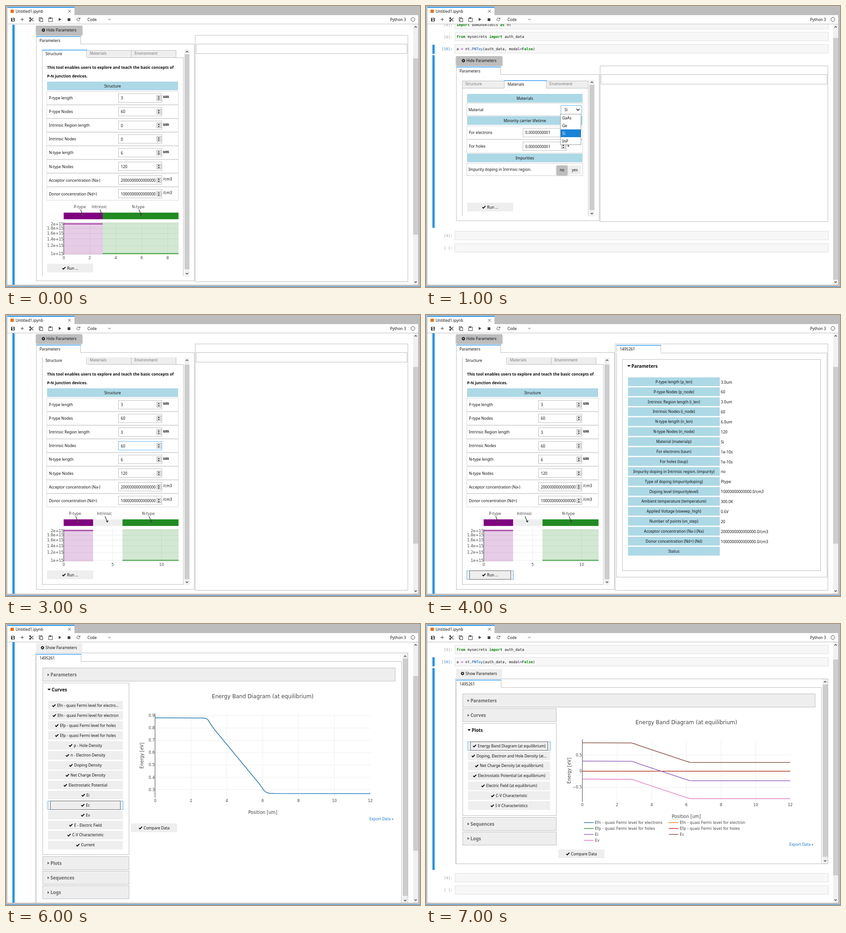
These frames come from a looping animation (907x617 px, 8 s). An HTML page with a canvas:

```html
<!DOCTYPE html>
<html lang="en">
<head>
<meta charset="utf-8">
<title>P-N junction notebook</title>
<style>
  html, body { margin: 0; width: 100%; height: 100%; overflow: hidden; background: #fff; }
  canvas { display: block; width: 907px; height: 617px; }
</style>
</head>
<body>
<canvas id="stage" width="907" height="617"></canvas>
<script>
const ctx = document.getElementById('stage').getContext('2d');
const UI = '8.4px "Noto Sans", sans-serif';
const UI_BOLD = 'bold 8.5px "Noto Sans", sans-serif';
const HEADING = 'bold 9.9px "Noto Sans", sans-serif';
const SERIF = 'bold 9.4px "Liberation Serif", serif';
const MONO = '7.94px "DejaVu Sans Mono", monospace';
const MONO_BOLD = 'bold ' + MONO;
const plotFont = size => size + 'px "DejaVu Sans", sans-serif';
const BLUE = '#2196f3', LINE = '#bdbdbd', PALE = '#eee', SKY = '#add8e6';

// ---- basic shapes ----
const snap = v => Math.floor(v) + 0.5;
function fill(x0, y0, x1, y1, color) {
  ctx.fillStyle = color;
  ctx.fillRect(Math.round(x0), Math.round(y0), Math.round(x1) - Math.round(x0), Math.round(y1) - Math.round(y0));
}
function softFill(x0, y0, x1, y1, color) {
  ctx.fillStyle = color;
  ctx.fillRect(x0, y0, x1 - x0, y1 - y0);
}
function frame(x0, y0, x1, y1, color = LINE, back) {
  if (back) fill(x0, y0, x1, y1, back);
  ctx.strokeStyle = color;
  ctx.lineWidth = 1;
  ctx.strokeRect(snap(x0), snap(y0), snap(x1) - snap(x0), snap(y1) - snap(y0));
}
function path(points, color, width = 1) {
  ctx.beginPath();
  points.forEach(([x, y]) => ctx.lineTo(x, y));
  ctx.strokeStyle = color;
  ctx.lineWidth = width;
  ctx.stroke();
}
function poly(points, color) {
  ctx.beginPath();
  points.forEach(([x, y]) => ctx.lineTo(x, y));
  ctx.fillStyle = color;
  ctx.fill();
}
const rule = (x0, y0, x1, y1, color = LINE) => path([[snap(x0), snap(y0)], [snap(x1), snap(y1)]], color);
// y is the middle of the capitals
function text(s, x, y, { font = UI, color = '#111', align = 'left' } = {}) {
  ctx.font = font;
  ctx.fillStyle = color;
  ctx.textAlign = align;
  ctx.fillText(s, x, y + 0.36 * parseFloat(font.replace('bold ', '')));
}
function clipped(x0, y0, x1, y1, draw) {
  ctx.save();
  ctx.beginPath();
  ctx.rect(x0, Math.round(y0), x1 - x0, Math.round(y1) - Math.round(y0));
  ctx.clip();
  draw();
  ctx.restore();
}
function chevron(x, y, dir, size = 2.5, color = '#444', width = 1.4) {
  path([[x - size, y - dir * size / 2], [x, y + dir * size / 2], [x + size, y - dir * size / 2]], color, width);
}
function check(x, y) {
  path([[x + 0.8, y], [x + 3, y + 2.2], [x + 7.4, y - 2.4]], '#111', 2);
}
function gear(x, y) {
  ctx.beginPath();
  for (let i = 0; i < 32; i++) {
    const r = i % 4 < 2 ? 4 : 3, a = i * Math.PI / 16;
    ctx.lineTo(x + r * Math.cos(a), y + r * Math.sin(a));
  }
  ctx.closePath();
  ctx.moveTo(x + 1.4, y);
  ctx.arc(x, y, 1.4, 0, 7);
  ctx.fillStyle = '#111';
  ctx.fill('evenodd');
}

// ---- widgets ----
function scrollbar(x, y0, y1, t0, t1) {
  fill(x, y0, x + 11, y1, '#f0f0f0');
  fill(x, t0, x + 11, t1, '#cdcdcd');
  chevron(x + 5.5, y0 + 6, -1);
  chevron(x + 5.5, y1 - 6, 1);
}
function button(x0, y0, x1, y1, back = PALE, raised = false) {
  ctx.save();
  if (raised) Object.assign(ctx, { shadowColor: 'rgba(0,0,0,.4)', shadowBlur: 3, shadowOffsetY: 1.5 });
  fill(x0, y0, x1, y1, back);
  ctx.restore();
}
function checkButton(label, x0, y0, x1, { focus = false, raised = false } = {}) {
  button(x0, y0, x1, y0 + 19, PALE, raised);
  if (focus) {
    frame(x0 - 0.5, y0, x1, y0 + 19, '#64b5f6');
    frame(x0 + 5, y0, x1 - 5.5, y0 + 19, '#666');
  }
  ctx.font = UI;
  const left = (x0 + x1 - ctx.measureText(label).width - 11) / 2;
  check(left, y0 + 9.7);
  text(label, left + 11, y0 + 9.7);
}
function tab(label, x0, x1, y, active) {
  if (active) {
    fill(x0, y, x1 + 1, y + 18, '#fff');
    rule(x0, y, x0, y + 17);
    rule(x1, y, x1, y + 17);
    softFill(x0, y, x1 + 1, y + 1.4, BLUE);
    text(label, x0 + 7.5, y + 9.2);
  } else {
    frame(x0, y + 1, x1, y + 17, LINE, PALE);
    text(label, x0 + 7, y + 8.3, { color: '#777' });
  }
}
function header(label, x1, y) {
  fill(90, y, x1, y + 19, SKY);
  text(label, (90 + x1) / 2, y + 9.7, { align: 'center' });
}
function spinner(x, y) {
  frame(x, y - 5.5, x + 9, y + 5, '#aaa', '#eee');
  poly([[x + 2.5, y - 1.2], [x + 7, y - 1.2], [x + 4.75, y - 4]], '#222');
  poly([[x + 2.5, y + 1.2], [x + 7, y + 1.2], [x + 4.75, y + 4]], '#222');
}
function field(label, value, unit, y, { x1, input, focus = false }) {
  frame(89, y - 15, x1, y + 14, '#d8d8d8');
  text(label, 94, y);
  frame(input, y - 10, input + 95, y + 9, focus ? '#64b5f6' : LINE);
  text(value, input + 5.5, y + 0.3);
  spinner(input + 84, y);
  text(unit, input + 98, y - 3, { font: unit[0] === '/' ? UI : SERIF });
}
function triangle(x, y, open, color) {
  poly(open ? [[x, y - 2], [x + 7, y - 2], [x + 3.5, y + 2]] : [[x, y - 3], [x + 4, y], [x, y + 3]], color);
}
function accordion(label, x1, y0, y1) {
  const open = y1 - y0 > 40;
  frame(80, y0, x1, y1, LINE, open ? '#fff' : PALE);
  triangle(91, y0 + 15, open, open ? '#111' : '#666');
  text(label, open ? 100 : 97.5, y0 + 15.2, { font: HEADING, color: open ? '#111' : '#666' });
}

// ---- application window ----
function chrome() {
  fill(0, 0, 907, 617, LINE);
  fill(3, 20, 903, 612, '#fff');
  fill(3, 2, 150, 21, '#fff');
  fill(3, 2, 150, 4, BLUE);
  fill(10, 8, 17, 15, '#ef6c00');
  text('Untitled1.ipynb', 21, 12);
  path([[136, 8.5], [142, 14.5]], '#444');
  path([[142, 8.5], [136, 14.5]], '#444');
  fill(3, 39, 903, 40, LINE);
  fill(0, 616, 907, 617, BLUE);

  const ink = '#444';
  fill(11, 26, 19, 34, ink);
  fill(13, 27, 17, 29, '#fff');
  fill(14, 30, 17, 33, '#fff');
  path([[32, 29.5], [39, 29.5]], ink);
  path([[35.5, 26], [35.5, 33]], ink);
  path([[52, 26], [60, 33.5]], ink, 1.3);
  path([[60, 26], [52, 33.5]], ink, 1.3);
  for (const y of [26.8, 32.5]) {
    ctx.beginPath();
    ctx.arc(53, y, 1.5, 0, 7);
    ctx.stroke();
  }
  frame(72, 25, 78, 32, ink);
  frame(74, 27, 80, 34, ink, '#fff');
  frame(93, 26, 101, 34, ink);
  fill(95, 25, 99, 28, ink);
  poly([[115.5, 26], [115.5, 33], [121, 29.5]], ink);
  fill(135, 27, 141, 33, ink);
  ctx.beginPath();
  ctx.arc(158.5, 29.5, 3.2, 0.3, 5.4);
  ctx.stroke();
  poly([[159, 28.7], [162.5, 28.7], [162.5, 25.3]], ink);
  text('Code', 178.5, 29.7);
  chevron(226.5, 29.5, 1, 2.8, ink, 1);
  text('Python 3', 841.5, 29.7);
  ctx.beginPath();
  ctx.arc(891.5, 29.5, 4.2, 0, 7);
  ctx.lineWidth = 1;
  ctx.stroke();
}

function cell(number, y, right, code = []) {
  const active = number === '10';
  frame(63, y, right, y + 19, '#e0e0e0', '#f7f7f7');
  text(`[${number}]:`, 58, y + 9.8, { font: MONO, color: active ? '#307fc1' : '#999', align: 'right' });
  if (active) fill(14, y, 19, y + 20, BLUE);
  let x = 67;
  for (const [part, color = '#111', font = MONO] of code) {
    text(part, x, y + 9.6, { font, color });
    x += ctx.measureText(part).width;
  }
}
const key = word => [word, '#008000', MONO_BOLD];
const op = sign => [sign, '#aa22ff', MONO_BOLD];

function notebook(top, height, right = 881) {
  const y = top - 46.8;
  cell('8', y - 53.5, right, [key('import'), [' domunoktools '], key('as'), [' nt']]);
  cell('9', y - 26.8, right, [key('from'), [' mysecrets '], key('import'), [' auth_data']]);
  cell('10', y, right, [['a '], op('='), [' nt.'], ['PNToy', '#0055aa'], ['(auth_data, modal'], op('='), key('False'), [')']]);
  fill(14, top - 23.5, 19, top + height + 14, BLUE);
  cell('4', top + height + 21.2, right);
  cell(' ', top + height + 48, right);
}

// ---- parameter forms ----
function paramsPanel(top, height, R, activeTab, scroll, thumb, content, right = 880) {
  const bottom = top + height, side = R - 23.5;
  button(66, top - 21.5, 167, top - 1.5, LINE, true);
  gear(82, top - 11.5);
  text('Hide Parameters', 88.5, top - 11.5);
  frame(66, top + 19, R, bottom - 1.5);
  tab('Parameters', 66, 163, top + 1.8, true);
  frame(R + 2, top, right, bottom);

  clipped(78, top + 29.5, R - 22, bottom - 12, () => {
    ctx.save();
    ctx.translate(0, -scroll);
    frame(79, top + 49, side, bottom - 8.5);
    const w = Math.min(97.7, (side - 79) / 3);
    const names = ['Structure', 'Materials', 'Environment'];
    names.forEach((label, i) => {
      if (i !== activeTab) tab(label, 79 + i * w, 79 + (i + 1) * w, top + 31.5, false);
    });
    tab(names[activeTab], 79 + activeTab * w, 79 + (activeTab + 1) * w, top + 31.5, true);
    content(top);
    ctx.restore();
  });
  scrollbar(Math.round(R - 21.5), top + 30, bottom - 11.5, thumb[0], thumb[1]);
}
function emptyOutput(top, R, right = 878) {
  frame(R + 4, top + 19, right, top + 40);
}

function dopingPlot(y, intrinsic) {
  const step = intrinsic ? 21.43 : 28.45, X = v => 126.6 + v * step;
  const pEnd = X(3), nStart = X(3 + intrinsic), end = 378;
  const font = plotFont(8.35), purple = '#800080', green = '#228b22', ink = '#444';

  softFill(126.4, y + 12.7, pEnd, y + 27.2, purple);
  softFill(pEnd, y + 12.7, nStart, y + 27.2, PALE);
  softFill(nStart, y + 12.7, end, y + 27.2, green);
  [['P-type', 1.5], ['Intrinsic', 3 + intrinsic / 2], ['N-type', 6 + intrinsic]].forEach(([label, v]) => {
    const x = X(v) - 1;
    text(label, x - 6.5, y, { font, color: ink, align: 'center' });
    path([[x - 5, y + 6], [x - 0.5, y + 17]], ink, 1.4);
    poly([[x + 0.5, y + 20], [x - 3.5, y + 16.5], [x + 2.5, y + 15]], ink);
  });

  for (const v of [1, 1.2, 1.4, 1.6, 1.8, 2]) {
    const ty = y + 102.5 - 65 * Math.log2(v);
    rule(126, ty, end, ty, '#eee');
    text(v + 'e+15', 126, ty, { font, color: ink, align: 'right' });
  }
  for (let v = 0; X(v) < end; v += intrinsic ? 5 : 2) {
    rule(X(v), y + 34, X(v), y + 105, '#eee');
    text(v, X(v), y + 112, { font, color: ink, align: 'center' });
  }
  softFill(126.4, y + 34, pEnd, y + 105, 'rgba(128,0,128,.2)');
  softFill(nStart, y + 34, end, y + 105, 'rgba(34,139,34,.2)');
  rule(126, y + 34, 126, y + 105, '#444');
  path([[126, y + 37.5], [pEnd, y + 37.5]], purple, 1.5);
  path([[nStart, y + 102.5], [end, y + 102.5]], green, 1.5);
}

function structureForm(intrinsic, focus) {
  return top => {
    text('This tool enables users to explore and teach the basic concepts of', 90, top + 70.5, { font: UI_BOLD });
    text('P-N junction devices.', 90, top + 89.5, { font: UI_BOLD });
    header('Structure', 377, top + 101.5);
    [
      ['P-type length', '3', 'um'],
      ['P-type Nodes', '60', ''],
      ['Intrinsic Region length', String(intrinsic), 'um'],
      ['Intrinsic Nodes', String(intrinsic * 20), ''],
      ['N-type length', '6', 'um'],
      ['N-type Nodes', '120', ''],
      ['Acceptor concentration (Na-)', '2000000000000000', '/cm3'],
      ['Donor concentration (Nd+)', '1000000000000000', '/cm3'],
    ].forEach(([label, value, unit], i) =>
      field(label, value, unit, top + 137.5 + i * 30.1, { x1: 377, input: 246, focus: focus === 'nodes' && i === 3 }));
    dopingPlot(top + 376.5, intrinsic);
    checkButton('Run ...', 90, top + 501.5, 191, { focus: focus === 'run' });
  };
}

function materialsForm(top) {
  header('Materials', 343, top + 61.5);
  frame(89, top + 82, 343, top + 109, '#d0d0d0');
  text('Material', 93, top + 96);
  header('Minority carrier lifetime', 343, top + 110.5);
  field('For electrons', '0.0000000001', 's', top + 146.5, { x1: 343, input: 212 });
  field('For holes', '0.0000000001', 's', top + 176.7, { x1: 343, input: 212 });
  header('Impurities', 343, top + 192.5);
  frame(89, top + 214, 343, top + 241, '#d0d0d0');
  text('Impurity doping in Intrinsic region.', 93, top + 227.5);
  button(286, top + 218, 310, top + 238, LINE, true);
  text('no', 298, top + 228, { align: 'center' });
  button(312, top + 218, 339, top + 238);
  text('yes', 326, top + 228, { align: 'center' });
  checkButton('Run ...', 90, top + 300.5, 191);

  frame(295, top + 86.5, 340, top + 105.5, '#64b5f6', '#fff');
  text('Si', 303.5, top + 96);
  chevron(333, top + 96, 1, 3.4, '#111', 1.6);
  frame(294, top + 105.5, 339, top + 173, '#999', '#fff');
  fill(295, top + 139, 339, top + 156, '#1883d7');
  ['GaAs', 'Ge', 'Si', 'InP'].forEach((name, i) =>
    text(name, 298.5, top + 114 + i * 17, { color: i === 2 ? '#fff' : '#111' }));
}

function environmentForm(top) {
  header('Environment', 343, top + 61.5);
  [['Ambient temperature', '300', 'K'], ['Applied Voltage', '0.6', 'V'], ['Number of points', '20', '']]
    .forEach(([label, value, unit], i) => field(label, value, unit, top + 97 + i * 30.1, { x1: 343, input: 212 }));
  checkButton('Run ...', 90, top + 181.5, 191);
}

// ---- results ----
function summary(done) {
  frame(417, 83, 878, 575);
  tab('1495261', 417, 514, 65.9, true);
  frame(430, 97, 864, 561);
  triangle(441, 112, true, '#111');
  text('Parameters', 450, 112, { font: HEADING });
  [
    ['P-type length (p_len)', '3.0um'],
    ['P-type Nodes (p_node)', '60'],
    ['Intrinsic Region length (i_len)', '3.0um'],
    ['Intrinsic Nodes (i_node)', '60'],
    ['N-type length (n_len)', '6.0um'],
    ['N-type Nodes (n_node)', '120'],
    ['Material (materialp)', 'Si'],
    ['For electrons (taun)', '1e-10s'],
    ['For holes (taup)', '1e-10s'],
    ['Impurity doping in Intrinsic region. (impurity)', 'no'],
    ['Type of doping (impuritydoping)', 'Ptype'],
    ['Doping level (impuritylevel)', '10000000000000.0/cm3'],
    ['Ambient temperature (temperature)', '300.0K'],
    ['Applied Voltage (vsweep_high)', '0.6V'],
    ['Number of points (vn_step)', '20'],
    ['Acceptor concentration (Na-) (Na)', '2000000000000000.0/cm3'],
    ['Donor concentration (Nd+) (Nd)', '1000000000000000.0/cm3'],
    ['Status', done ? '2019-06-12T12:56:51-0400 domuNOK rappture 20...' : ''],
  ].forEach(([label, value], i) => {
    const y = 147 + i * 21.88;
    softFill(442.6, y - 10, 643.6, y + 9.2, SKY);
    text(label, 543, y - 0.2, { align: 'center' });
    text(value, 646, y + 0.5);
  });
  if (done) checkButton('Load Results', 443, 531, 544, { raised: true });
}

function resultsPanel(top, bottom, thumb) {
  button(66, top - 21.5, 167, top - 1.5);
  gear(80, top - 11.5);
  text('Show Parameters', 86.5, top - 11.5);
  frame(64, top, 880, bottom);
  scrollbar(869, Math.round(top) + 1, Math.min(bottom, 613), thumb[0], thumb[1]);
  clipped(64, top, 868, bottom, () => frame(66, top + 19, 866, bottom + 9));
  tab('1495261', 66, 164, top + 2.3, true);
  accordion('Parameters', 852, top + 33, top + 62);
}

function buttonList(labels, x1, y, focused) {
  labels.forEach((label, i) => checkButton(label, 92, y + i * 21.88, x1, { focus: i === focused }));
}

function axes({ title, x0, step, y0, y1, titleY, ticks, Y, labelY, unitX }) {
  const ink = '#444', font = plotFont(8.35), center = x0 + 6 * step;
  text(title, center, titleY, { font: plotFont(11.7), color: ink, align: 'center' });
  for (const v of ticks) {
    rule(x0, Y(v), 798, Y(v), '#eee');
    text(String(v).replace('-', '\u2212'), x0 - 1, Y(v), { font, color: ink, align: 'right' });
  }
  for (let v = 0; v <= 12; v += 2) {
    const x = x0 + v * step;
    if (v < 12) rule(x, y0, x, y1, v ? '#eee' : '#444');
    text(v, x, y1 + 6.5, { font, color: ink, align: 'center' });
  }
  text('Position [um]', center, labelY, { font: plotFont(9.65), color: ink, align: 'center' });
  ctx.save();
  ctx.translate(unitX, (y0 + y1) / 2 + 0.5);
  ctx.rotate(-Math.PI / 2);
  text('Energy [eV]', 0, 0, { font: plotFont(9.65), color: ink, align: 'center' });
  ctx.restore();
}
const exportLink = y => text('Export Data »', 796, y, { color: '#1976d2' });

function curvesView() {
  resultsPanel(63.5, 640, [76, 597]);
  accordion('Curves', 269, 129, 506);
  buttonList([
    'Efn - quasi Fermi level for electro...', 'Efn - quasi Fermi level for electron',
    'Efp - quasi Fermi level for holes', 'Efp - quasi Fermi level for holes',
    'p - Hole Density', 'n - Electron Density', 'Doping Density', 'Net Charge Density',
    'Electrostatic Potential', 'Ei', 'Ec', 'Ev', 'E - Electric Field', 'C-V Characteristic', 'Current',
  ], 256, 169.3, 10);
  ['Plots', 'Sequences', 'Logs'].forEach((label, i) => accordion(label, 269, 510 + i * 32.2, 539 + i * 32.2));
  axes({
    title: 'Energy Band Diagram (at equilibrium)', x0: 326.8, step: 39.27, y0: 196, y1: 381, titleY: 159,
    ticks: [0.3, 0.4, 0.5, 0.6, 0.7, 0.8, 0.9], Y: v => 201 + (0.9 - v) * 271, labelY: 413.8, unitX: 298,
  });
  path([[327, 206], [430, 206.5], [435, 206.8], [439, 208], [443, 211], [449, 221], [457, 232], [555, 351],
    [566, 366.5], [571, 370], [577, 371.8], [590, 372.3], [798, 372.5]], '#1f77b4', 1.5);
  exportLink(427.5);
  checkButton('Compare Data', 274, 438, 375);
}

function plotsView() {
  resultsPanel(120.2, 526, [133, 511]);
  accordion('Curves', 285, 185.5, 214.5);
  accordion('Plots', 285, 218, 420);
  buttonList([
    'Energy Band Diagram (at equilibrium)', 'Doping, Electron and Hole Density (at...',
    'Net Charge Density (at equilibrium)', 'Electrostatic Potential (at equilibrium)',
    'Electric Field (at equilibrium)', 'C-V Characteristic', 'I-V Characteristics',
  ], 272, 258, 0);
  accordion('Sequences', 285, 424, 453);
  accordion('Logs', 285, 456, 485);
  axes({
    title: 'Energy Band Diagram (at equilibrium)', x0: 342.6, step: 37.96, y0: 253, y1: 390, titleY: 215.7,
    ticks: [-0.5, 0, 0.5], Y: v => 323.2 - v * 70.5, labelY: 422.8, unitX: 314,
  });
  const purple = '#9467bd', brown = '#8c564b', pink = '#e377c2';
  path([[342.6, 323.2], [798, 323.2]], '#b03a1e', 1.6);
  [[purple, 301], [brown, 260.8], [pink, 340.4]].forEach(([color, y]) =>
    path([[342.6, y], [450, y + 0.5], [456, y + 2], [468, y + 6.5], [570, y + 40.5],
      [578, y + 42.9], [588, y + 43.2], [798, y + 43.2]], color, 1.5));
  [
    ['#1f77b4', 'Efn - quasi Fermi level for electrons'], ['#ff7f0e', 'Efn - quasi Fermi level for electron'],
    ['#2ca02c', 'Efp - quasi Fermi level for holes'], ['#d62728', 'Efp - quasi Fermi level for holes'],
    [purple, 'Ei'], [brown, 'Ec'], [pink, 'Ev'],
  ].forEach(([color, label], i) => {
    const x = i % 2 ? 532 : 346, y = 436 + Math.floor(i / 2) * 13;
    path([[x, y], [x + 21, y]], color, 1.5);
    text(label, x + 24, y, { font: plotFont(8.35), color: '#444' });
  });
  exportLink(484);
  checkButton('Compare Data', 290, 495, 391);
}

// ---- one scene per second ----
function structureScene(top, scroll, intrinsic, focus, output) {
  notebook(top, 540.5);
  paramsPanel(top, 540.5, 412, 0, scroll, scroll ? [109, 580] : [106, 578], structureForm(intrinsic, focus));
  output();
  scrollbar(892, 40, 612, top + 50, 502);
}
const scenes = [
  () => structureScene(64.5, 0, 0, '', () => emptyOutput(64.5, 412)),
  () => {
    notebook(131.5, 341.5);
    paramsPanel(131.5, 341.5, 379, 1, 0, [173, 448], materialsForm);
    emptyOutput(131.5, 379);
    scrollbar(892, 40, 612, 70, 601);
  },
  () => {
    notebook(150.5, 222, 892);
    paramsPanel(150.5, 222, 379, 2, 0, [192, 348], environmentForm, 891);
    emptyOutput(150.5, 379, 889);
  },
  () => structureScene(63.5, 4, 3, 'nodes', () => emptyOutput(63.5, 412)),
  () => structureScene(63.5, 4, 3, 'run', () => summary(false)),
  () => structureScene(63.5, 4, 3, '', () => summary(true)),
  () => {
    notebook(63.5, 576.5);
    curvesView();
    scrollbar(892, 40, 612, 114, 498);
  },
  () => {
    notebook(120.2, 405.8);
    plotsView();
    scrollbar(892, 40, 612, 78, 552);
  },
];

function draw() {
  const scene = scenes[Math.floor(performance.now() % 8000 / 1000)];
  chrome();
  clipped(3, 40, 903, 612, scene);
  requestAnimationFrame(draw);
}
draw();
</script>
</body>
</html>
```
